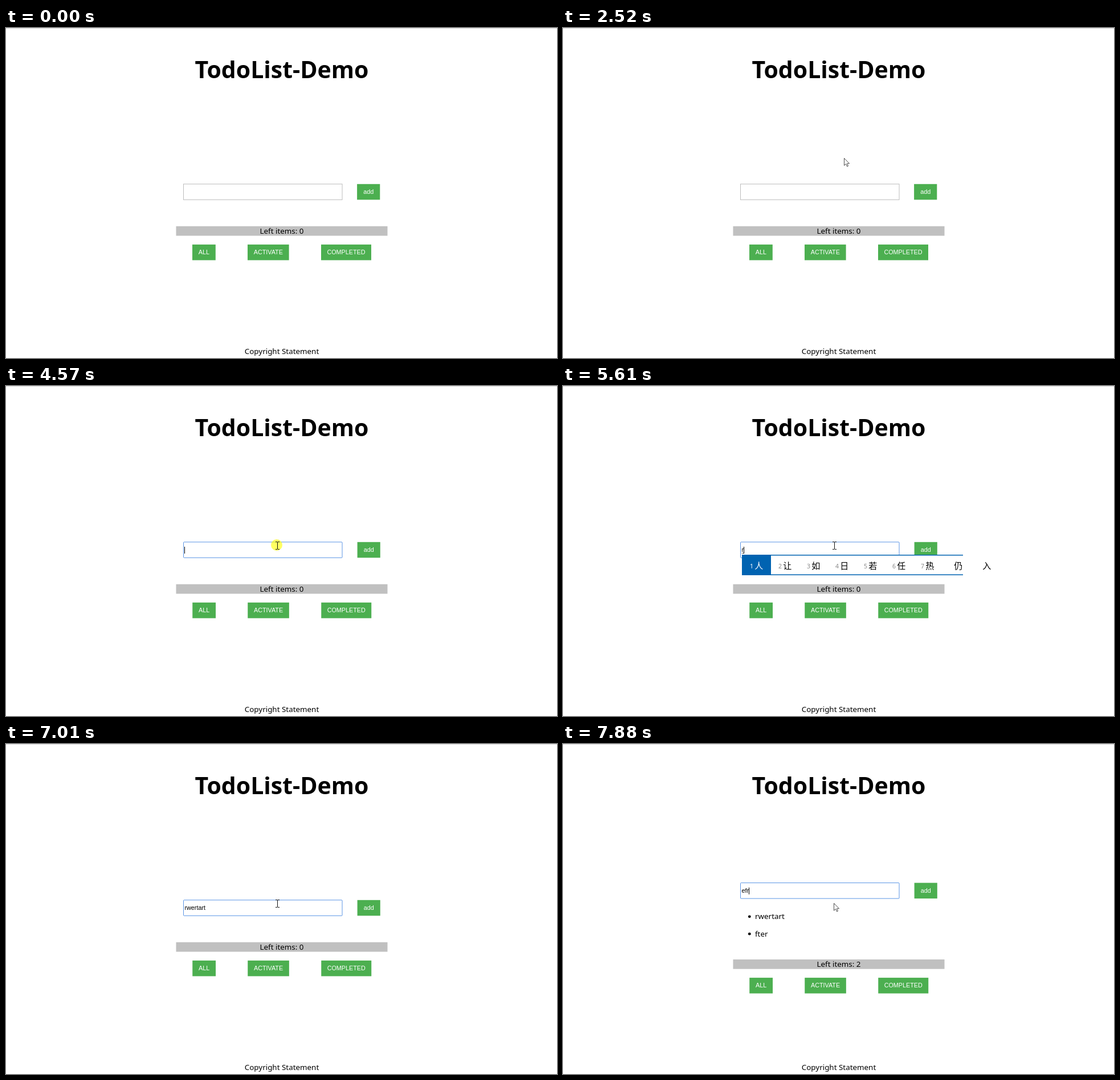
Recreate the animation shown at these times as an HTML page. Size 967x579 px, loop 8000 ms.

```html
<!DOCTYPE html>
<html lang="en">
<head>
<meta charset="utf-8">
<title>TodoList-Demo</title>
<style>
  html, body { margin: 0; width: 100%; height: 100%; overflow: hidden; background: #fff; }
  svg { display: block; width: 967px; height: 579px; }
  text { font: 13.4px "Noto Sans", "Open Sans", sans-serif; white-space: pre; }
  .mid { text-anchor: middle; }
  #title { font-size: 41px; font-weight: bold; }
  .button rect { fill: #4caf50; }
  .button text, #value { font: 10.8px "Liberation Sans", Arial, sans-serif; }
  .button text { fill: #fff; text-anchor: middle; }
  #popup text { font: 15px "Noto Sans CJK SC", "Noto Sans CJK", sans-serif; }
  #popup .num { font: 10.5px "Noto Sans", sans-serif; fill: #888; }
  #popup .picked, #popup .num.picked { fill: #fff; }
</style>
</head>
<body>
<svg viewBox="0 0 967 579">
  <rect width="967" height="1" fill="#d8d8d8"/>
  <text id="title" class="mid" x="484" y="88">TodoList-Demo</text>
  <text class="mid" x="484" y="571.5">Copyright Statement</text>

  <g id="top">
    <rect id="field" x="311.5" y="273.8" width="278.5" height="27.5" fill="#fff"/>
    <text id="value" x="313.4" y="291"></text>
    <path id="underline" stroke="#000" stroke-dasharray="1 1"/>
    <rect id="caret" y="282" width="1" height="12"/>
    <g id="add" class="button"></g>
  </g>
  <g id="list"></g>
  <g id="bottom">
    <rect x="298.5" y="347.8" width="371" height="16.7" fill="#c0c0c0"/>
    <text id="left" class="mid" x="484" y="361"></text>
    <g id="filters" class="button"></g>
  </g>
  <g id="popup"></g>
  <circle id="click" r="10" fill="#ff0" opacity=".62"/>
  <g id="pointer">
    <path id="arrow" d="M.5.5V13.2L3.5 10.5L5.6 15L7.5 14.1L5.5 9.8H9.5Z" fill="#fff" stroke="#222" stroke-width=".8"/>
    <path id="beam" d="M-2 -5.5H.8L1.5 -5L2.2 -5.5H5M1.5 -5V7M-2 7.5H.8L1.5 7L2.2 7.5H5" fill="none" stroke="#111"/>
  </g>
</svg>
<script>
const LOOP = 8000;
const $ = id => document.getElementById(id);
const latest = (list, t) => list.filter(e => e[0] <= t).pop();
const show = (id, on) => $(id).setAttribute('visibility', on ? 'visible' : 'hidden');
const move = (id, x, y) => $(id).setAttribute('transform', `translate(${x} ${y})`);

const button = (x, y, w, label) =>
  `<rect x="${x}" y="${y}" width="${w}" height="27.5"/><text x="${x + w / 2}" y="${y + 17.3}">${label}</text>`;
$('add').innerHTML = button(616.1, 273.8, 40.2, 'add');
$('filters').innerHTML = button(327, 379.9, 40.8, 'ALL') +
  button(424, 379.9, 72.6, 'ACTIVATE') + button(553, 379.9, 88, 'COMPLETED');

const typed = [
  [0, ''], [5510, 'r'], [5680, 'rw'], [5760, 'rwert'], [5840, 'rwertar'], [5990, 'rwertart'],
  [7080, ''], [7390, 'ft'], [7460, 'fte'], [7540, 'fter'], [7710, ''], [7790, 'ef'], [7880, 'efr']
];
const todos = [[7080, 'rwertart'], [7710, 'fter']];

// start, left edge, candidates, settled, opacity
const ta = '他 她 它 太 图 天 贴';
const popups = [
  [0],
  [5610, 314, '人 让 如 日 若 任 热 仍 入', false, 1],
  [5680, 314, '任务 让我 认为 日文 软文 如为 热望 人物 入伍', false, 1],
  [5760],
  [5990, 348, ta, true, .6],
  [6080, 348, ta, true, 1],
  [6450, 348, ta, true, .5],
  [6540]
];

// start, end, steps, destination
const rest = [884, 571];
const moves = [
  [550, 780, 4, 705, 443], [1030, 1490, 7, 541, 301],
  [1800, 2050, 4, 493, 228], [3960, 4340, 6, 475, 279]
];

function pointerAt(t) {
  let [x, y] = rest;
  for (const [start, end, steps, tx, ty] of moves) {
    if (t < start) break;
    const step = Math.min(steps, Math.floor((t - start) / (end - start) * (steps - 1) + 1e-6) + 1);
    x += (tx - x) * step / steps;
    y += (ty - y) * step / steps;
  }
  return [x, y];
}

function popupMarkup([, x, words, settled, opacity]) {
  if (!words) return '';
  const items = words.split(' ');
  const step = 35 + 15 * items[0].length;
  const width = 7 * step + 38;
  const blue = '#0063b1';
  let out = `<g transform="translate(${x} 296)" opacity="${opacity}">
    <rect width="${width}" height="36" fill="#fff"/>
    <path d="M0 .7H${width}M0 35.3H${width}" stroke="${blue}" stroke-width="1.4"/>
    <rect width="${step + 1}" height="36" fill="${blue}"/>`;
  items.forEach((word, i) => {
    const picked = i ? '' : 'picked';
    if (i < 7) out += `<text class="num ${picked}" x="${14 + i * step}" y="24">${i + 1}</text>`;
    out += `<text class="${picked}" x="${22.3 + i * step}" y="25.3">${word}</text>`;
  });
  if (settled) out += `
    <path d="M${width - 36.5} 0V36M${width - .7} 0V36" stroke="${blue}" stroke-width="1.4"/>
    <g transform="translate(${width - 18.5} 18)" fill="none" stroke="#111" stroke-width="1.1">
      <circle r="6.7"/><path d="M-3.5 2Q0 6 3.5 2"/>
      <path d="M-3.2 -2h1.6M1.6 -2h1.6" stroke-width="1.6"/>
    </g>`;
  return out + '</g>';
}

let lastPopup;
function draw(t) {
  const done = todos.filter(e => e[0] <= t);
  const n = done.length;
  move('top', 0, -15.1 * n);
  move('bottom', 0, 15.1 * n);
  $('left').textContent = 'Left items: ' + n;
  $('list').innerHTML = done.map(([, word], i) => {
    const y = 337.4 - 15.1 * n + 30.4 * i;
    return `<circle cx="327.3" cy="${y - 4.4}" r="2.4"/><text x="337" y="${y}">${word}</text>`;
  }).join('');

  // Buttons settle half a pixel to the right.
  const nudge = t >= 3410 ? .5 : 0;
  move('add', nudge, 0);
  move('filters', nudge / 2, 0);

  const focused = t >= 4570;
  $('field').setAttribute('stroke', focused ? '#5a95e5' : '#bcbcbc');
  $('field').setAttribute('rx', focused ? 1 : 0);
  const value = latest(typed, t)[1];
  $('value').textContent = value;
  const end = 313.4 + (value ? $('value').getComputedTextLength() : 0);
  $('caret').setAttribute('x', Math.round(end - .2));
  show('caret', focused && !(t >= 5110 && t < 5510) && !(t >= 7010 && t < 7080));
  const composing = t >= 5510 && t < 6450;
  $('underline').setAttribute('d', `M${t < 5990 ? 314 : 348} 293.5H${end}`);
  show('underline', composing);

  const popup = latest(popups, t);
  if (popup !== lastPopup) {
    $('popup').innerHTML = popupMarkup(popup);
    lastPopup = popup;
  }

  const [x, y] = pointerAt(t);
  const beam = y > 274 && x < 500 && t < 7710;
  move('pointer', x, y);
  show('pointer', t >= 550);
  $('arrow').style.display = beam ? 'none' : '';
  $('beam').style.display = beam ? '' : 'none';
  move('click', x, y);
  show('click', (t >= 2300 && t < 2520) || (t >= 4570 && t < 4740));
}

const begin = performance.now();
function tick() {
  draw((performance.now() - begin) % LOOP);
  requestAnimationFrame(tick);
}
tick();
</script>
</body>
</html>
```
